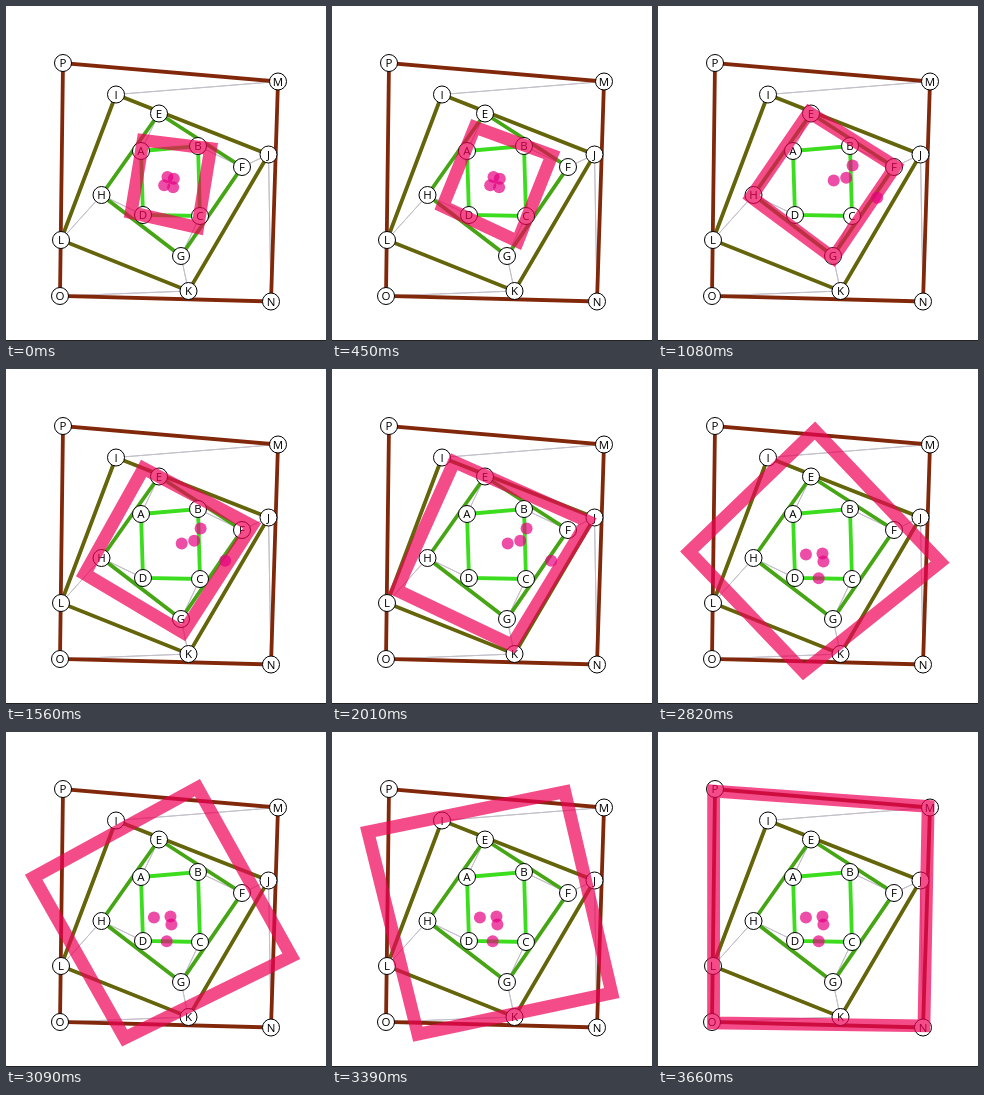
Animation of 320x335 px, one loop 3690 ms. Source, as an HTML page with a canvas:

```html
<!DOCTYPE html>
<html lang="en">
<head>
<meta charset="utf-8">
<title>Spiral quad morph</title>
<style>
html, body { margin: 0; width: 100%; height: 100%; overflow: hidden; background: #fff; }
canvas { display: block; }
</style>
</head>
<body>
<canvas id="stage" width="320" height="335"></canvas>
<script>
const ctx = document.getElementById('stage').getContext('2d');
const LOOP = 3690, MORPH = 1311;
const STARTS = [-407, 1000, 2363];
const quads = [
  [[135, 145], [192, 140], [194, 210], [137, 209]],
  [[153, 107.5], [236, 161], [175, 250], [95.5, 189]],
  [[110, 88.5], [262.5, 148.5], [182.5, 285], [55, 234]],
  [[272, 75.5], [265, 295.5], [54, 290], [57, 57]]
];
const colors = ['#3cdc1e', '#46a514', '#64640a', '#82280a'];

const sub = (a, b) => [a[0] - b[0], a[1] - b[1]];
const add = (a, b) => [a[0] + b[0], a[1] + b[1]];
const mul = (a, b) => [a[0] * b[0] - a[1] * b[1], a[0] * b[1] + a[1] * b[0]];
const div = (a, b) => {
  const n = b[0] * b[0] + b[1] * b[1];
  return mul(a, [b[0] / n, -b[1] / n]);
};

// Similarity taking edge a-b to edge c-d, as scale, angle and fixed point.
function spiral(a, b, c, d) {
  const m = div(sub(d, c), sub(b, a));
  return {
    scale: Math.hypot(...m),
    angle: Math.atan2(m[1], m[0]),
    center: div(sub(c, mul(m, a)), sub([1, 0], m))
  };
}

function swirl(p, s, t) {
  const r = s.scale ** t, a = s.angle * t;
  return add(s.center, mul(sub(p, s.center), [r * Math.cos(a), r * Math.sin(a)]));
}

const spirals = quads.slice(0, 3).map((q, k) => q.map((p, i) => {
  const j = (i + 1) % 4, next = quads[k + 1];
  return spiral(p, q[j], next[i], next[j]);
}));

function polygon(points, color, width) {
  ctx.beginPath();
  points.forEach(p => ctx.lineTo(...p));
  ctx.closePath();
  ctx.strokeStyle = color;
  ctx.lineWidth = width;
  ctx.stroke();
}

function disc(p, r, fill) {
  ctx.beginPath();
  ctx.arc(p[0], p[1], r, 0, Math.PI * 2);
  ctx.fillStyle = fill;
  ctx.fill();
}

function label(p, text) {
  disc(p, 8.5, '#fff');
  ctx.strokeStyle = '#000';
  ctx.lineWidth = 1;
  ctx.stroke();
  ctx.fillStyle = '#000';
  ctx.fillText(text, p[0], p[1] + 4);
}

function drawScene() {
  ctx.fillStyle = '#fff';
  ctx.fillRect(0, 0, 320, 335);
  for (let k = 0; k < 3; k++) {
    quads[k].forEach((p, i) => polygon([p, quads[k + 1][i]], '#c4c0ca', 1));
  }
  quads.forEach((q, k) => polygon(q, colors[k], 3.8));
  ctx.font = '11.5px "Open Sans", "Noto Sans", sans-serif';
  ctx.textAlign = 'center';
  quads.flat().forEach((p, i) => label(p, String.fromCharCode(65 + i)));
  ctx.fillStyle = '#222';
  ctx.fillRect(0, 334, 320, 1);
}

function frame(now) {
  const time = Math.floor(now % LOOP / 30) * 30;
  const k = time < STARTS[1] ? 0 : time < STARTS[2] ? 1 : 2;
  const t = Math.min(1, (time - STARTS[k]) / MORPH);
  const edges = spirals[k];
  // Each corner is the mean of where its two edges carry it.
  const shape = quads[k].map((p, i) => {
    const sum = add(swirl(p, edges[i], t), swirl(p, edges[(i + 3) % 4], t));
    return [sum[0] / 2, sum[1] / 2];
  });
  drawScene();
  polygon(shape, 'rgba(238, 0, 86, 0.7)', 12.8);
  edges.forEach(s => disc(s.center, 6, 'rgba(230, 0, 130, 0.7)'));
  requestAnimationFrame(frame);
}
requestAnimationFrame(frame);
</script>
</body>
</html>
```
